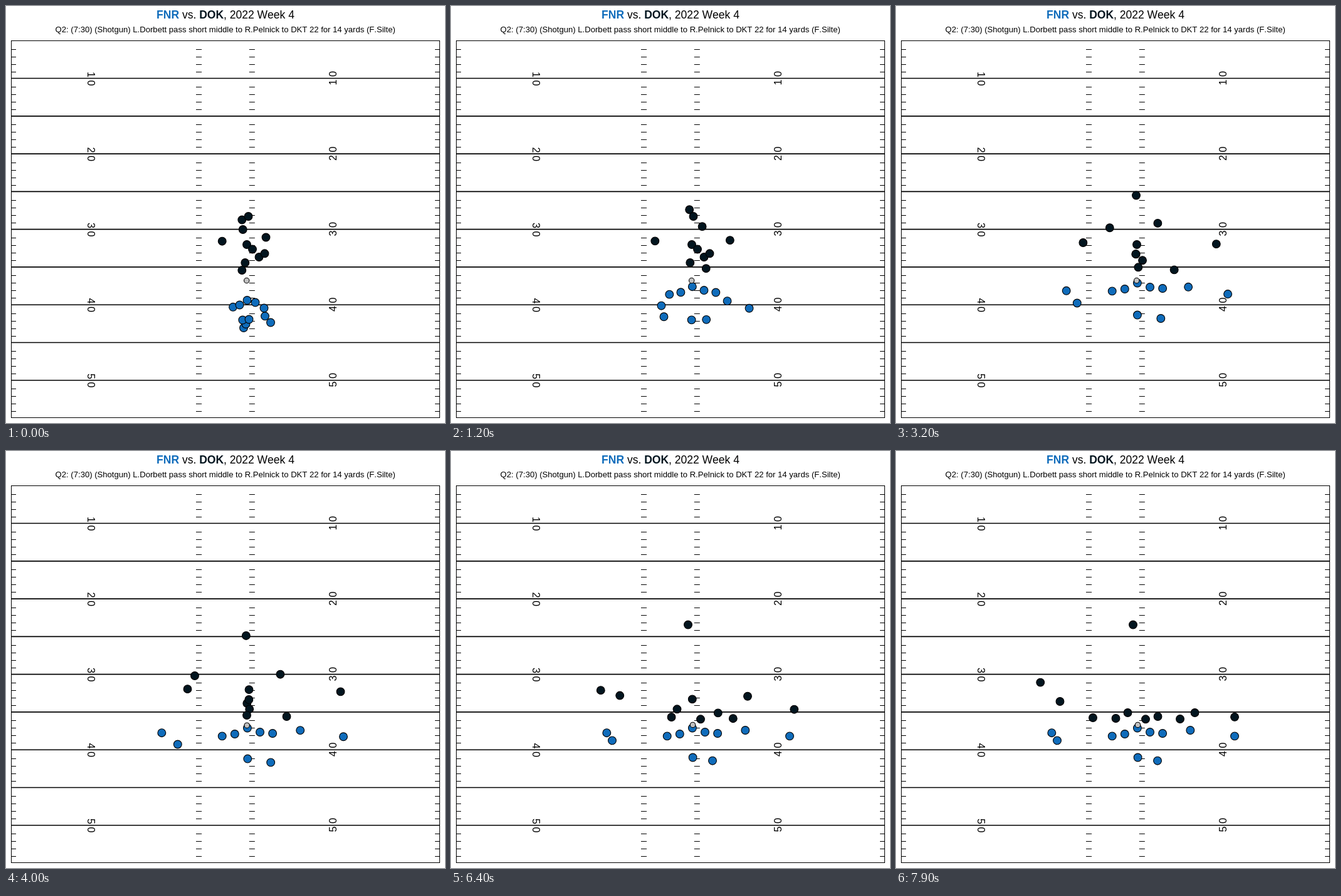
Recreate the animation shown at these times as an HTML page. Size 700 by 666 pixels, loop 8 s.

```html
<!DOCTYPE html>
<html lang="en">
<head>
<meta charset="utf-8">
<title>Play tracking</title>
<style>
  html, body { margin: 0; width: 100%; height: 100%; overflow: hidden; background: #fff; }
  svg { display: block; width: 700px; height: 666px; font-family: "Liberation Sans", Arial, sans-serif; }
  text { text-anchor: middle; white-space: pre; font-kerning: none; }
  .team { font-weight: bold; }
</style>
</head>
<body>
<svg id="stage" viewBox="0 0 700 666">
  <text x="350" y="20" font-size="17.5"><tspan class="team" fill="#0f6cbb">FNR</tspan> vs. <tspan class="team" fill="#02151f">DOK</tspan>, 2022 Week 4</text>
  <text x="349.7" y="42" font-size="13.1">Q2: (7:30) (Shotgun) L.Dorbett pass short middle to R.Pelnick to DKT 22 for 14 yards (F.Silte)</text>
</svg>
<script>
const BLUE = '#0f6cbb', DARK = '#02151f', GREY = '#c0c0c0';
const LOOP = 8000, STEP = 100;
const stage = document.getElementById('stage');

function add(tag, attrs, text) {
  const el = document.createElementNS('http://www.w3.org/2000/svg', tag);
  for (const key in attrs) el.setAttribute(key, attrs[key]);
  if (text) el.textContent = text;
  return stage.appendChild(el);
}

function drawField() {
  const top = 55.3, gap = 60.27, yard = gap / 5;
  let lines = '', ticks = '';
  for (let i = 0; i < 10; i++) {
    const y = top + i * gap;
    if (i) lines += `M8.5 ${y}H691.5`;
    for (let k = 0; k < 4; k++) {
      const ty = Math.floor(y + 13.9 + k * yard) + 0.5;
      ticks += `M9 ${ty}h7M303 ${ty}h9M387.8 ${ty}h9M684 ${ty}h7`;
    }
    if (i % 2) {
      const label = `${(i + 1) / 2} 0`;
      add('text', { 'font-size': 16.2, transform: `translate(130 ${y + 0.6}) rotate(90)` }, label);
      add('text', { 'font-size': 16.2, transform: `translate(527 ${y - 0.4}) rotate(-90)` }, label);
    }
  }
  add('path', { d: ticks, stroke: '#000', 'stroke-width': 1.1 });
  add('path', { d: lines, stroke: '#000', 'stroke-width': 1.6 });
  add('rect', { x: 8.5, y: 55.5, width: 683, height: 602, fill: 'none', stroke: '#000' });
}

// Smooth curve through values evenly spaced over u = 0..1, with parabolic ends.
function spline(values) {
  const n = values.length - 1;
  const beyond = (a, b, c) => 3 * (a - b) + c;
  const p = [beyond(...values), ...values, beyond(...values.slice(-3).reverse())];
  return u => {
    const i = Math.min(Math.floor(u * n), n - 1), f = u * n - i;
    const [a, b, c, d] = p.slice(i, i + 4);
    return b + f / 2 * (c - a + f * (2 * a - 5 * b + 4 * c - d + f * (3 * (b - c) + d - a)));
  };
}

const dots = [];
// Moves along the points between two times; two points alone slow down to a stop.
function run(fill, [from, to], points, r = 6.4) {
  if (points.length === 2) {
    const [a, b] = points;
    points = [a, a.map((v, i) => v + 0.75 * (b[i] - v)), b];
  }
  const [x, y] = [0, 1].map(axis => spline(points.map(p => p[axis])));
  const el = add('circle', { r, fill, stroke: '#000', 'stroke-width': 1.1 });
  dots.push({ el, x, y, from, to });
}

drawField();

// Secondary
run(DARK, [0, 6400], [[376.3, 341.5], [383, 302.5], [378, 277.5]]);
run(DARK, [2200, 7900], [[386.5, 336], [457.5, 371], [476.5, 418]]);
run(DARK, [0, 8000], [[377.7, 357], [394, 351.5], [301, 359], [245, 382], [230.5, 368]]);
run(DARK, [0, 7900], [[344.7, 375.7], [290, 380], [261.5, 400]]);
run(DARK, [0, 7900], [[414.5, 369.5], [467, 377], [532.5, 384], [547, 408], [540, 424.8]]);

// Defensive front
run(DARK, [3400, 7900], [[384, 381], [388.5, 389], [369.5, 418]]);
run(DARK, [2400, 7200], [[393, 388.5], [384.3, 403], [423, 413], [417.5, 424]]);
run(DARK, [2400, 5800], [[403.5, 401], [388, 413], [398, 428.3]]);
run(DARK, [1200, 7700], [[412.5, 395.3], [385, 396.5], [385, 396.5], [402.5, 402.3], [360.5, 412.3], [314, 426]]);
run(DARK, [2400, 7200], [[381.3, 410], [384, 422], [357.5, 423.5], [350.5, 427]]);
run(DARK, [0, 6500], [[376.3, 422], [409, 419], [435, 419], [448, 424], [430, 421.5], [453, 428]]);

// Backfield and receivers
run(BLUE, [0, 5200], [[379, 514], [302, 480], [257, 462.4]]);
run(BLUE, [0, 6000], [[382.5, 508], [385.6, 489.5]]);
run(BLUE, [0, 4000], [[377.3, 501.5], [309, 467], [248.3, 450.2]]);
run(BLUE, [0, 5000], [[387.5, 500.5], [419.5, 500], [417, 494.7]]);
run(BLUE, [0, 4200], [[413, 495.3], [469.3, 446]]);
run(BLUE, [0, 4600], [[422, 505.5], [540, 455.4]]);

// Offensive line, settling into even spacing
const line = [[362, 480.8, 455.4], [372.5, 477.5, 452], [384.5, 470, 442.5], [397.5, 473.5, 449], [411.5, 482.5, 451]];
line.forEach(([x, y, end], i) => run(BLUE, [0, 2200], [[x, y], [344.7 + 20.1 * i, end]]));

// Ball
run(GREY, [3600, 6400], [[383.7, 438.5], [385.5, 437.4]], 4.2);

function draw(now) {
  const t = Math.floor(now % LOOP / STEP) * STEP;
  for (const { el, x, y, from, to } of dots) {
    const u = Math.min(1, Math.max(0, (t - from) / (to - from)));
    el.setAttribute('cx', x(u));
    el.setAttribute('cy', y(u));
  }
}

const start = performance.now();
function tick() {
  draw(performance.now() - start);
  requestAnimationFrame(tick);
}
tick();
</script>
</body>
</html>
```
